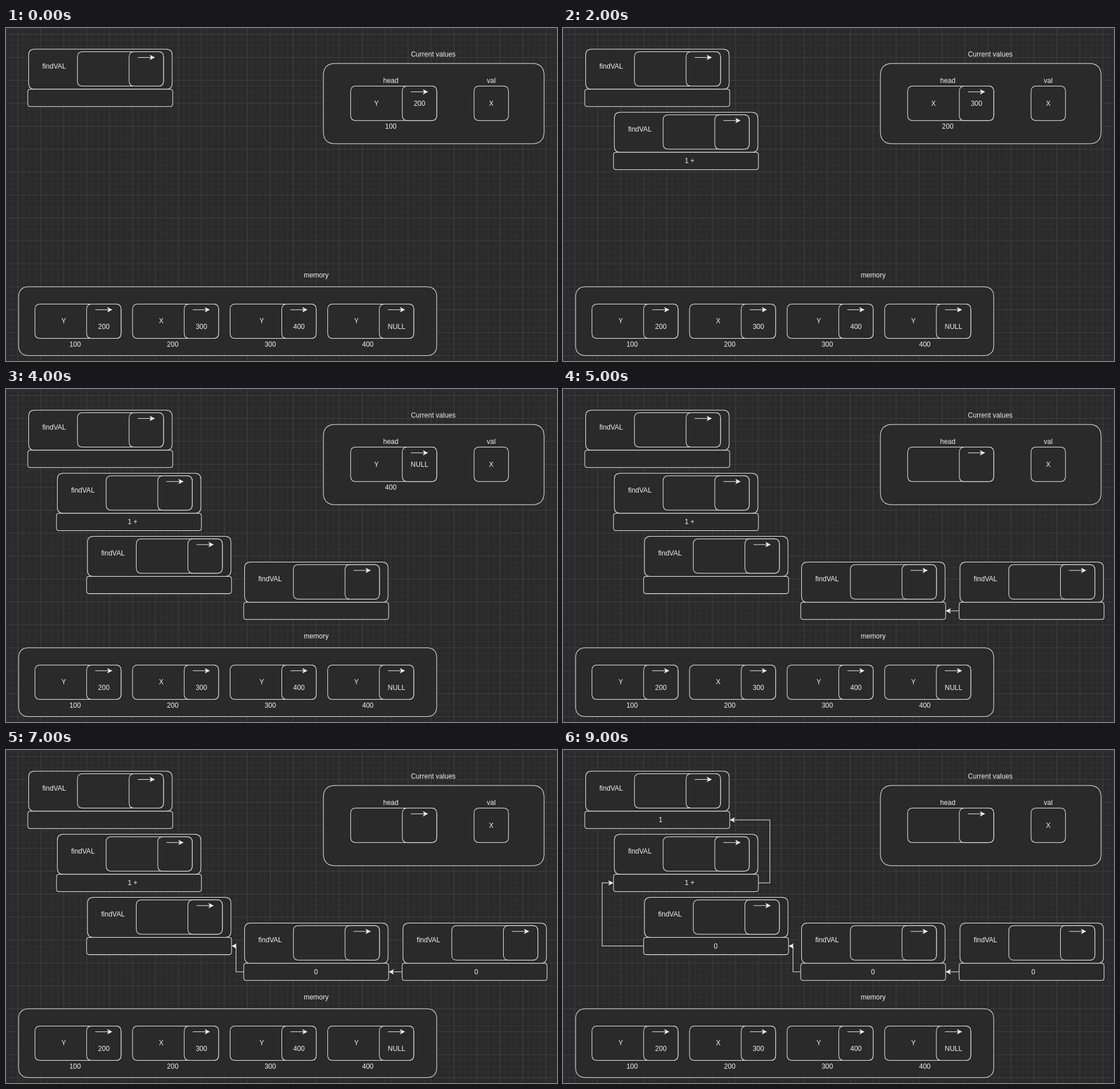
An HTML page that plays this animation: 962x582 px, repeating every 10 s.

```html
<!DOCTYPE html>
<html lang="en">
<head>
<meta charset="utf-8">
<title>Recursive list search</title>
<style>
  html, body { margin: 0; width: 100%; height: 100%; overflow: hidden; background: #2a2a2a; }
  svg { display: block; }
  text { font: 12px "Liberation Sans", Arial, sans-serif; fill: #f0f0f0; text-anchor: middle; }
  .line { fill: none; stroke: #f0f0f0; }
  .box { fill: #2a2a2a; stroke: #f0f0f0; }
  .head { fill: #f0f0f0; stroke: #f0f0f0; }
  .grid { fill: none; stroke: #424242; }
</style>
</head>
<body>
<svg width="962" height="582" viewBox="0 0 962 582">
  <defs>
    <pattern id="grid" width="40" height="40" patternUnits="userSpaceOnUse" x="-.5" y="-.5">
      <path class="grid" opacity=".35" d="M0 10.5H40M0 20.5H40M0 30.5H40M10.5 0V40M20.5 0V40M30.5 0V40"/>
      <path class="grid" d="M0 .5H40M.5 0V40"/>
    </pattern>
  </defs>
  <g transform="translate(20.5 11.4) scale(1.0021)">
    <rect x="-40" y="-40" width="1020" height="640" fill="url(#grid)"/>
    <g id="scene"></g>
  </g>
</svg>
<script>
const scene = document.getElementById('scene');

const text = (x, y, value) => `<text x="${x}" y="${y + 4}">${value}</text>`;

function box(x, y, w, h) {
  const r = Math.min(w, h) * 0.15;
  return `<path class="box" d="M${x + r} ${y}h${w - 2 * r}q${r} 0 ${r} ${r}v${h - 2 * r}q0 ${r} ${-r} ${r}
    h${2 * r - w}q${-r} 0 ${-r} ${-r}v${2 * r - h}q0 ${-r} ${r} ${-r}z"/>`;
}

// Polyline whose last, horizontal segment ends in an arrowhead.
function arrow(...points) {
  const [x, y] = points.pop();
  const dir = Math.sign(x - points[points.length - 1][0]);
  return `<path class="line" d="M${points.join('L')}L${x - 6.4 * dir} ${y}"/>
    <path class="head" d="M${x - 1.1 * dir} ${y}l${-7 * dir} 3.5l${1.75 * dir} -3.5l${-1.75 * dir} -3.5z"/>`;
}

const node = (x, y) =>
  box(x, y, 150, 60) + box(x + 90, y, 60, 60) + arrow([x + 105, y + 10], [x + 135, y + 10]);

const call = (dx, dy) =>
  box(19 + dx, 25.5 + dy, 250, 70) + text(63.5 + dx, 55 + dy, 'findVAL') +
  node(104 + dx, 30 + dy) + box(17.5 + dx, 95.5 + dy, 252.5, 30);

// Each entry is [x, value, next]; x places the value inside its node.
const list = [[80, 'Y', '200'], [250, 'X', '300'], [425, 'Y', '400'], [590, 'Y', 'NULL']];

const memory = text(520, 420, 'memory') + box(1.5, 440, 728.5, 120) +
  list.map(([x, value, next], i) => {
    const left = 30 + 170 * i;
    return node(left, 470) + text(x, 500, value) +
      text(left + 120, 510, next) + text(left + 70, 540, 100 * (i + 1));
  }).join('');

const current = text(724, 35, 'Current values') + box(532.5, 50.5, 384.5, 140) +
  text(650, 80, 'head') + node(580, 90) +
  text(825, 80, 'val') + box(795, 90, 60, 60) + text(825, 120, 'X');

// Everything that appears, with the second in which it does.
const events = [
  [0, call(0, 0)],
  [1, call(50, 110)],
  [2, text(200, 220.5, '1 +')],
  [3, call(102.5, 220)],
  [4, call(376.2, 265)],
  [5, call(652.2, 265) + arrow([669.7, 375.5], [646.2, 375.5])],
  [6, text(799, 375.5, '0')],
  [7, text(519.5, 375.5, '0') +
      arrow([393.7, 375.5], [380.3, 375.5], [380.3, 330.5], [372.5, 330.5])],
  [8, text(245.5, 330.5, '0') +
      arrow([120, 330.5], [47.7, 330.5], [47.7, 220.5], [67.5, 220.5])],
  [9, text(149.5, 110.5, '1') +
      arrow([320, 220.5], [340, 220.5], [340, 110.5], [270, 110.5])]
];

function headValues(step) {
  const index = [0, 1, 1, 2, 3][step];
  if (index === undefined) return '';
  const [, value, next] = list[index];
  return text(625, 120, value) + text(700, 120, next) + text(650, 160, 100 * (index + 1));
}

let shown = -1;
function frame() {
  const step = Math.floor(performance.now() / 1000) % 10;
  if (step !== shown) {
    shown = step;
    scene.innerHTML = memory + current + headValues(step) +
      events.filter(([from]) => from <= step).map(([, shape]) => shape).join('');
  }
  requestAnimationFrame(frame);
}
frame();
</script>
</body>
</html>
```
